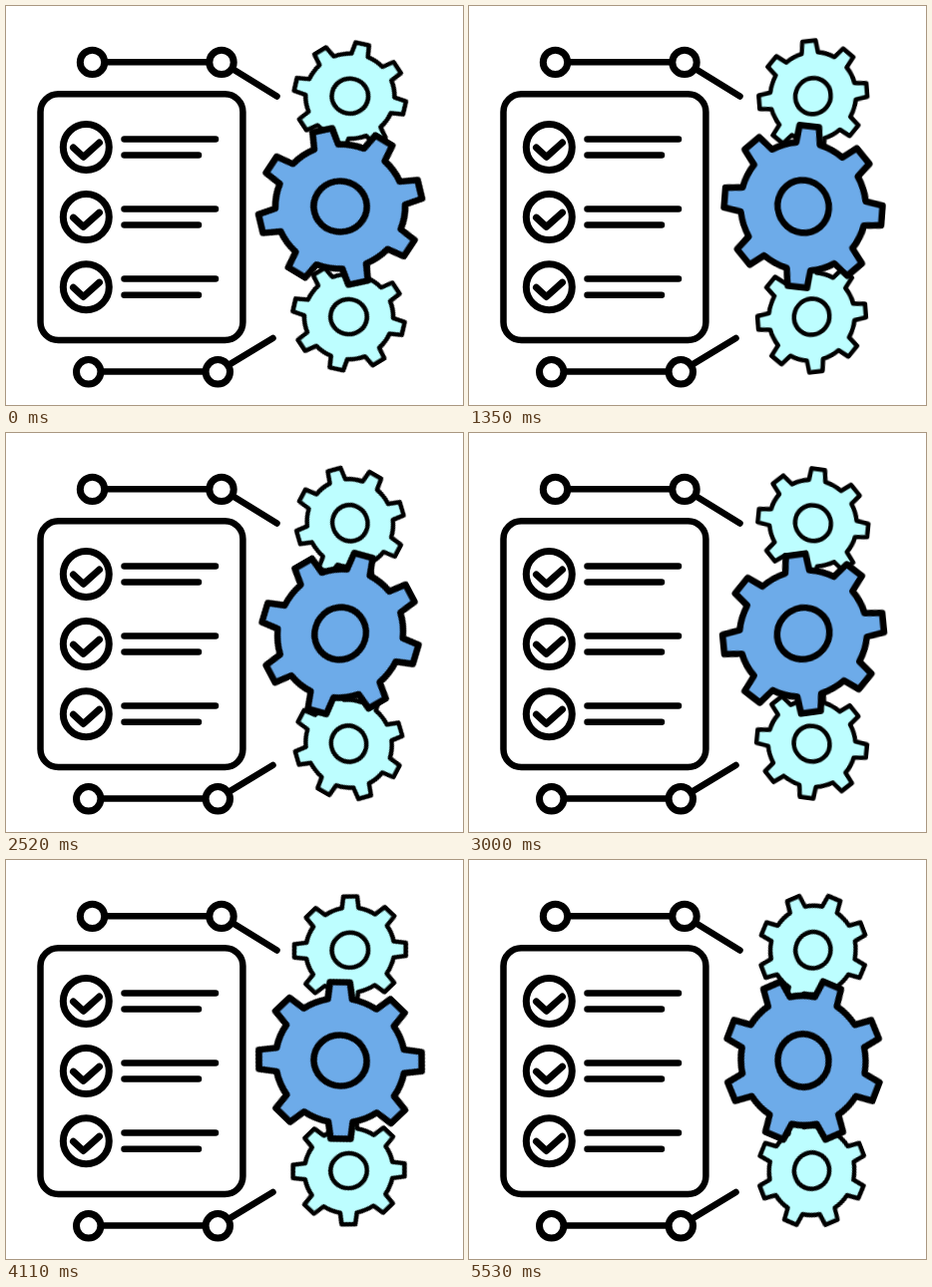
Write an HTML page that moves like this. It is 458 px wide and 400 px high and loops after 5.61 s.

```html
<!DOCTYPE html>
<html lang="en">
<head>
<meta charset="utf-8">
<title>Checklist and gears</title>
<style>
  html, body { margin: 0; width: 100%; height: 100%; overflow: hidden; background: #fff; }
  svg { display: block; width: 458px; height: 400px; }
  .ink { fill: none; stroke: #000; stroke-width: 6.5; stroke-linecap: round; stroke-linejoin: round; }
  .bold { stroke-width: 7; }
  .node { fill: #fff; stroke-width: 7; }
  .small { fill: #bdfeff; }
  .big { fill: #6dabe9; }

  /* 71 poses per loop, each 1/97 of a turn */
  .spin { animation: spin 5610ms steps(71) -16ms infinite; }
  .small .spin { animation-name: back; }
  @keyframes spin {
    from { transform: rotate(0deg); }
    to { transform: rotate(263.5deg); }
  }
  @keyframes back {
    from { transform: rotate(0deg); }
    to { transform: rotate(-263.5deg); }
  }
</style>
</head>
<body>
<svg viewBox="0 0 458 400">
  <defs>
    <g id="row">
      <circle class="bold" cx="80.3" cy="141.5" r="23"/>
      <path class="bold" d="M67.5 142 L77.5 151.3 L93.5 137"/>
      <path d="M118.5 133.4 H210 M118.5 149.5 H193"/>
    </g>
  </defs>

  <g class="ink">
    <rect x="34.5" y="88.2" width="202.9" height="246.8" rx="18"/>
    <use href="#row"/>
    <use href="#row" y="70.1"/>
    <use href="#row" y="140.2"/>

    <path d="M86.5 56.2 H216 L271.5 90.5"/>
    <circle class="node" cx="86.5" cy="56.4" r="12.2"/>
    <circle class="node" cx="216" cy="56.4" r="12.2"/>

    <path d="M82.7 366.6 H212 L267.5 333"/>
    <circle class="node" cx="82.7" cy="366.8" r="12.2"/>
    <circle class="node" cx="212.3" cy="366.8" r="12.2"/>
  </g>

  <g class="ink">
    <g class="small" transform="translate(344.8 90.3) scale(.685)"><g class="spin"></g></g>
    <g class="small" transform="translate(343.5 311.5) scale(.685)"><g class="spin"></g></g>
    <g class="big" transform="translate(335 201)"><g class="spin"></g></g>
  </g>
</svg>
<script>
  const TEETH = 8, ROOT = 63.5, TIP = 79.7, BASE_HALF = 12, TIP_HALF = 9.8;
  const START = 32.3;

  // Turns a point given relative to an upright tooth
  function turned(x, y, angle) {
    const c = Math.cos(angle), s = Math.sin(angle);
    return (x * c - y * s).toFixed(2) + ' ' + (x * s + y * c).toFixed(2);
  }

  function gearPath() {
    const base = -Math.sqrt(ROOT ** 2 - BASE_HALF ** 2);
    let d = '';
    for (let i = 0; i < TEETH; i++) {
      const a = i * 2 * Math.PI / TEETH;
      d += i ? `A${ROOT} ${ROOT} 0 0 1 ` : 'M';
      d += turned(-BASE_HALF, base, a);
      d += 'L' + turned(-TIP_HALF, -TIP, a);
      d += 'L' + turned(TIP_HALF, -TIP, a);
      d += 'L' + turned(BASE_HALF, base, a);
    }
    return d + `A${ROOT} ${ROOT} 0 0 1 ${turned(-BASE_HALF, base, 0)}Z`;
  }

  // Gears are slightly oval, and the long axis turns with them
  const path = gearPath();
  document.querySelectorAll('.spin').forEach(g => {
    const angle = g.closest('.small') ? -START : START;
    g.innerHTML = `<g transform="scale(1.025 .982) rotate(${angle})">
      <path d="${path}"/><circle r="26"/></g>`;
  });
</script>
</body>
</html>
```
